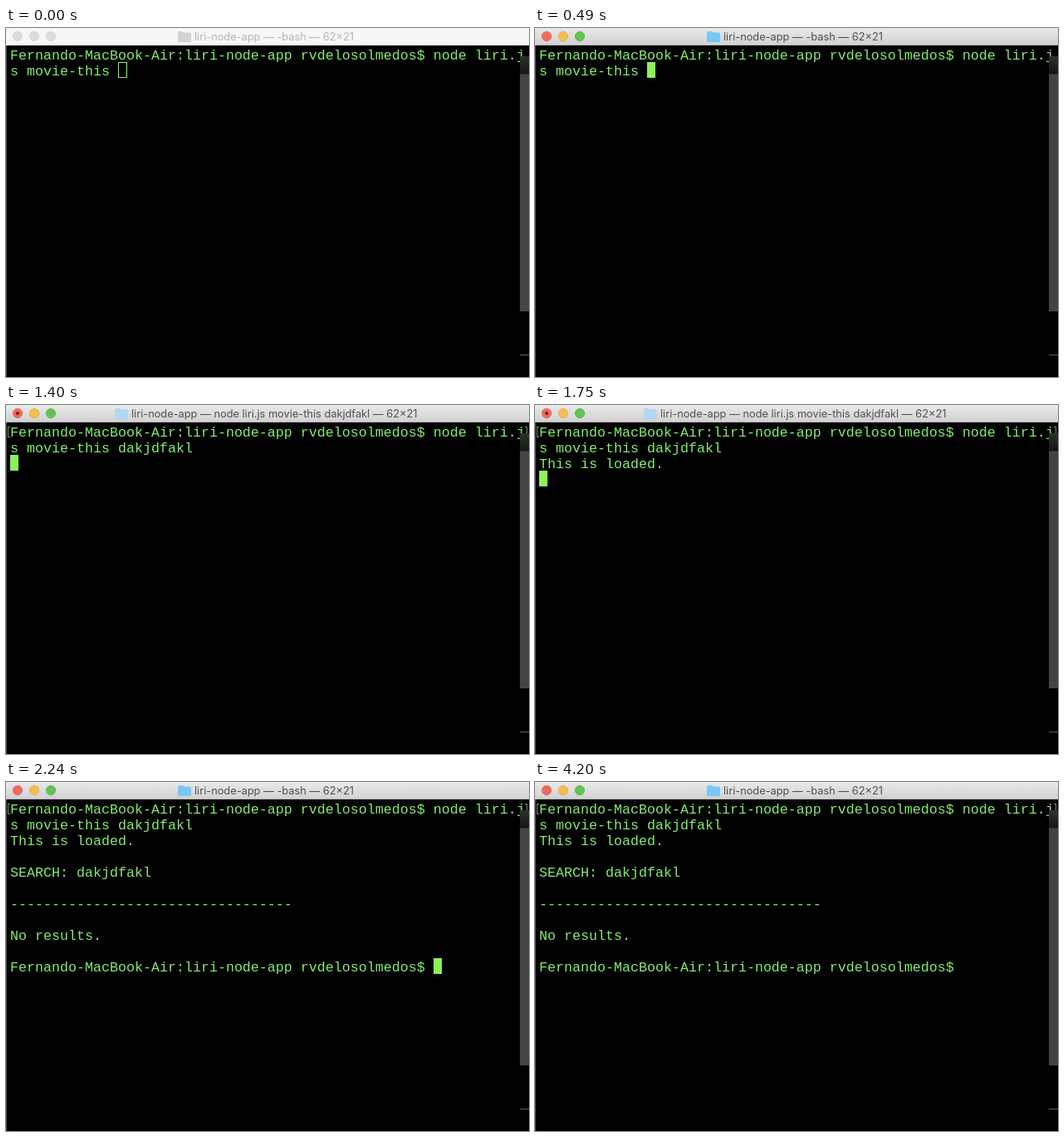
An HTML page for the animation above (4340 ms loop, 630 px wide and 420 px high).

```html
<!DOCTYPE html>
<html lang="en">
<head>
<meta charset="utf-8">
<title>Terminal</title>
<style>
  html, body { margin: 0; width: 100%; height: 100%; overflow: hidden; background: #000; }
  #stage { position: relative; width: 630px; height: 420px; overflow: hidden; background: #000; }
  #stage * { box-sizing: border-box; }
  .anim { animation: 4.34s step-end infinite; }

  /* Title bar */
  .bar, .bar svg { position: absolute; left: 0; top: 0; width: 630px; height: 21px; }
  .bar text { font: 12.8px Inter, "Liberation Sans", sans-serif; }
  .idle { background: #f7f7f7; fill: #b4b4b4; }
  .active {
    background: linear-gradient(#e9e9e9, #d2d2d2);
    border-bottom: 1px solid #b2b2b2;
    fill: #505050;
    animation-name: focus;
  }
  .shell { animation-name: shell; }
  .busy { animation-name: busy; }
  @keyframes focus { 0% { opacity: 0 } 11.29%, 100% { opacity: 1 } }
  @keyframes shell { 0% { opacity: 1 } 32.25% { opacity: 0 } 43.54%, 100% { opacity: 1 } }
  @keyframes busy { 0% { opacity: 0 } 32.25% { opacity: 1 } 43.54%, 100% { opacity: 0 } }

  /* Terminal text, on a 10 by 19 pixel grid */
  pre {
    position: absolute; left: 5px; top: 24px; margin: 0;
    font: 16.667px/19px "Liberation Mono", "DejaVu Sans Mono", monospace;
    color: #84ec6e;
  }
  .typed {
    display: inline-block; height: 19px; overflow: hidden; vertical-align: top;
    animation-name: type;
  }
  .loaded { animation-name: loaded; }
  .results { animation-name: results; }
  @keyframes type {
    0% { width: 0 } 17.74% { width: 2ch } 20.96% { width: 5ch }
    22.58% { width: 7ch } 25.8%, 100% { width: 9ch }
  }
  @keyframes loaded { 0% { opacity: 0 } 40.32%, 100% { opacity: 1 } }
  @keyframes results { 0% { opacity: 0 } 43.54%, 100% { opacity: 1 } }

  .cursor {
    position: absolute; width: 10px; height: 19px;
    border: 1px solid #8df255;
    animation-name: cursor;
  }
  @keyframes cursor {
    0% { left: 135px; top: 41px; width: 11px; background: transparent; opacity: 1 }
    11.29% { left: 135px; top: 41px; width: 10px; background: #8df255; opacity: 1 }
    17.74% { left: 155px; top: 41px; width: 10px; background: #8df255; opacity: 1 }
    20.96% { left: 185px; top: 41px; width: 10px; background: #8df255; opacity: 1 }
    22.58% { left: 205px; top: 41px; width: 10px; background: #8df255; opacity: 1 }
    25.8% { left: 225px; top: 41px; width: 10px; background: #8df255; opacity: 1 }
    32.25% { left: 5px; top: 60px; width: 10px; background: #8df255; opacity: 1 }
    40.32% { left: 5px; top: 79px; width: 10px; background: #8df255; opacity: 1 }
    43.54% { left: 515px; top: 212px; width: 10px; background: #8df255; opacity: 1 }
    72.58% { left: 515px; top: 212px; width: 10px; background: #8df255; opacity: 0 }
    83.87% { left: 515px; top: 212px; width: 10px; background: #8df255; opacity: 1 }
    96.77%, 100% { left: 515px; top: 212px; width: 10px; background: #8df255; opacity: 0 }
  }

  /* Marks at both ends of the entered line */
  .mark {
    position: absolute; top: 26px; width: 3px; height: 13px;
    border: 1px solid #7d8a7b;
    animation-name: marks;
  }
  .mark.open { left: 2px; border-right: 0; }
  .mark.close { left: 625px; border-left: 0; }
  @keyframes marks { 0% { opacity: 0 } 32.25%, 100% { opacity: 1 } }

  /* Window edges */
  .left { position: absolute; left: 0; top: 21px; width: 1px; height: 399px; background: #4c4c4c; }
  .side {
    position: absolute; left: 619px; top: 34px; width: 11px; height: 307px;
    background: linear-gradient(#303030, #151515 21px, #444 22px);
  }
  .rule { position: absolute; left: 619px; top: 393px; width: 11px; height: 1px; background: #5c5c5c; }
</style>
</head>
<body>
<div id="stage">
  <svg width="0" height="0" style="position:absolute">
    <defs>
      <path id="folder" d="M0 5.5Q0 4 1.5 4H5.5L7 5.5H14.5Q16 5.5 16 7V15.5Q16 17 14.5 17H1.5Q0 17 0 15.5Z"/>
    </defs>
  </svg>

  <div class="bar idle">
    <svg>
      <g fill="#dcdcdc" stroke="#cfcfcf" stroke-width=".6">
        <circle cx="14" cy="10" r="5.7"/><circle cx="34" cy="10" r="5.7"/><circle cx="54" cy="10" r="5.7"/>
      </g>
      <use href="#folder" x="207" fill="#d2d2d2"/>
      <text x="227" y="15">liri-node-app — -bash — 62×21</text>
    </svg>
  </div>

  <div class="bar active anim">
    <svg>
      <g stroke-width=".6">
        <circle cx="14" cy="10" r="5.7" fill="#ee6a5f" stroke="#d5574c"/>
        <circle cx="34" cy="10" r="5.7" fill="#f5bd4f" stroke="#d8a13c"/>
        <circle cx="54" cy="10" r="5.7" fill="#61c454" stroke="#4fa73f"/>
      </g>
      <g class="shell anim">
        <path d="M208 6V4H213L215 6Z" fill="#5fb4e2"/>
        <use href="#folder" x="207" fill="#77c8f5"/>
        <text x="227" y="15">liri-node-app — -bash — 62×21</text>
      </g>
      <g class="busy anim">
        <circle cx="14" cy="10" r="2" fill="#7c1510"/>
        <use href="#folder" x="131" fill="#aed9f0"/>
        <text x="151" y="15">liri-node-app — node liri.js movie-this dakjdfakl — 62×21</text>
      </g>
    </svg>
  </div>

  <pre>Fernando-MacBook-Air:liri-node-app rvdelosolmedos$ node liri.j
s movie-this <span class="typed anim">dakjdfakl</span>
<span class="loaded anim">This is loaded.</span>
<span class="results anim">
SEARCH: dakjdfakl

----------------------------------

No results.

Fernando-MacBook-Air:liri-node-app rvdelosolmedos$</span></pre>

  <div class="mark open anim"></div>
  <div class="mark close anim"></div>
  <div class="cursor anim"></div>
  <div class="left"></div>
  <div class="side"></div>
  <div class="rule"></div>
</div>
</body>
</html>
```
